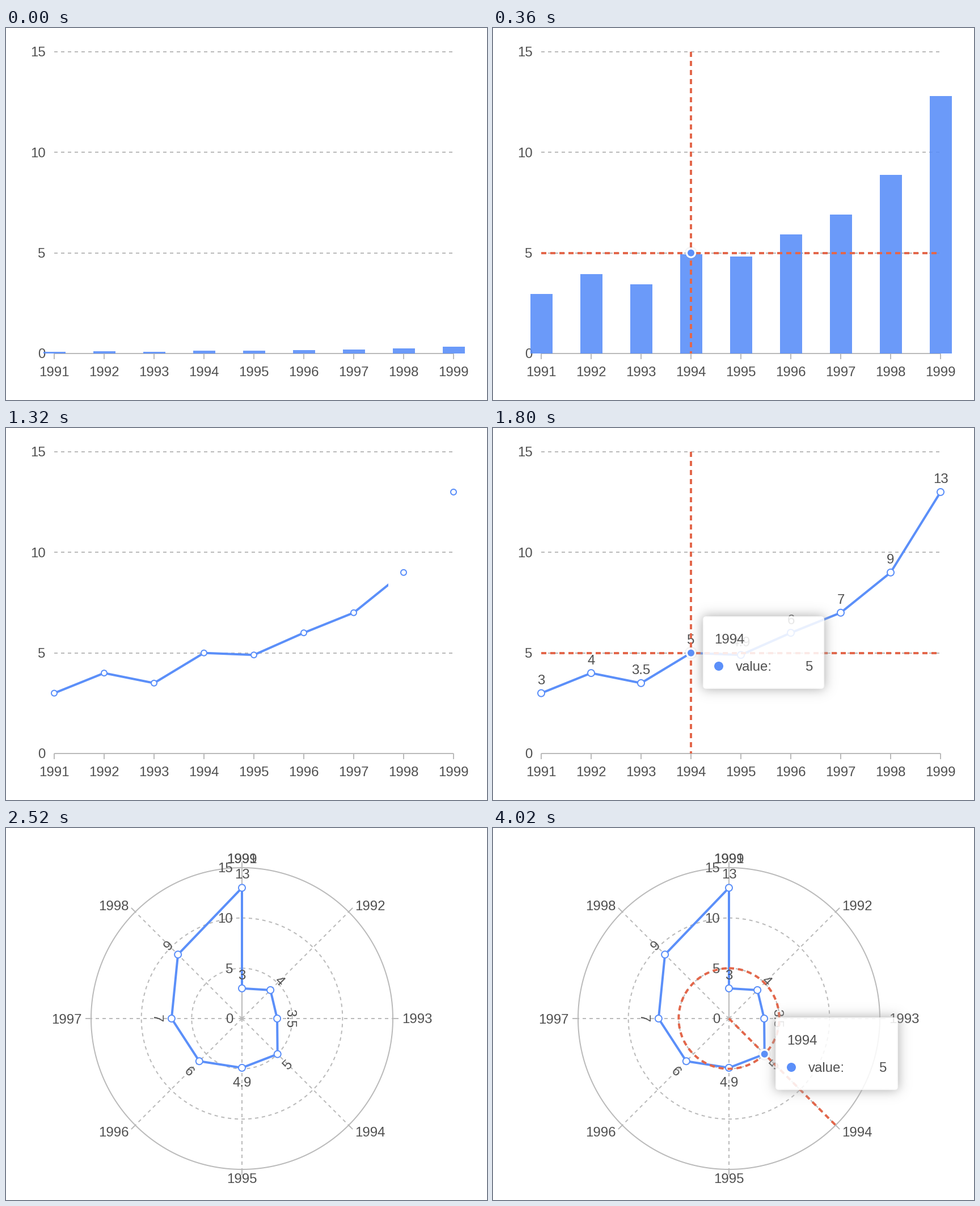
These frames come from a looping animation (848 by 656 pixels, 4080 ms). A matplotlib script:

```python
import math
from itertools import count

import matplotlib.pyplot as plt
import numpy as np
from matplotlib.animation import FuncAnimation
from matplotlib.lines import Line2D
from matplotlib.patches import Circle, FancyBboxPatch, Rectangle

plt.rcParams["font.family"] = "Liberation Sans"

W, H, DPI = 848, 656, 100
STEP, FRAMES = 60, 68
PT = 72 / DPI
YEARS = range(1991, 2000)
VALUES = np.array([3, 4, 3.5, 5, 4.9, 6, 7, 9, 13])
PICK = 3

BLUE, RED, GRAY, INK = "#5b8ff9", "#e3674b", "#bababa", "#505050"
GRID_DASH, CROSS_DASH = (6, 6), (9, 7)
LINE_AT, POLAR_AT = 1080, 2100
GROW = 416

LEFT, RIGHT, TOP, BASE = 85, 789, 42, 574
CX, CY, R = 416, 336, 266

fig = plt.figure(figsize=(W / DPI, H / DPI), dpi=DPI, facecolor="white")
ax = fig.add_axes((0, 0, 1, 1))
order = count(1)


def ease(t, duration=GROW, lead=0.0):
    t = min(max(t / duration + lead, 0), 1)
    return 1 - (1 - t) ** 2


def flat(i, v):
    return LEFT + 88 * np.asarray(i), BASE - np.asarray(v) * (BASE - TOP) / 15


def round_pos(i, r):
    a = np.asarray(i) * math.pi / 4
    return CX + r * np.sin(a), CY - r * np.cos(a)


def line(xs, ys, color=GRAY, width=2, dash=None, alpha=1):
    style = (0, [d / width for d in dash]) if dash else "-"
    art = Line2D(xs, ys, color=color, lw=width * PT, ls=style, alpha=alpha,
                 solid_capstyle="butt", solid_joinstyle="round", zorder=next(order))
    ax.add_line(art)
    return art


def patch(shape):
    shape.set_zorder(next(order))
    ax.add_patch(shape)


def dot(x, y, r, fill, edge="none", alpha=1):
    patch(Circle((x, y), r, fc=fill, ec=edge, lw=2 * PT, alpha=alpha))


def text(x, y, s, ha="center", turn=0, alpha=1):
    a = math.radians(turn)
    ax.text(x - 8.5 * math.sin(a), y + 8.5 * math.cos(a), s, ha=ha, va="baseline",
            rotation=-turn, rotation_mode="anchor", fontsize=24 * PT, color=INK,
            alpha=alpha, zorder=next(order))


def ring(r, **kw):
    line(*round_pos(np.linspace(0, 8, 241), r), **kw)


def flat_axes():
    for v in (5, 10, 15):
        y = flat(0, v)[1]
        line([LEFT, RIGHT], [y, y], dash=GRID_DASH)
    for v in (0, 5, 10, 15):
        text(69.5, flat(0, v)[1], str(v), "right")
    line([LEFT, RIGHT], [BASE, BASE])
    for i, year in enumerate(YEARS):
        x = flat(i, 0)[0]
        line([x, x], [BASE, BASE + 10])
        text(x, 606, str(year))


def polar_axes(alpha):
    for v in (5, 10):
        ring(v * R / 15, dash=GRID_DASH, alpha=alpha)
    ring(R, alpha=alpha)
    for i, year in enumerate(YEARS):
        ends = [round_pos(i, r) for r in (0, R, R + 10)]
        if i < 8:
            line(*zip(*ends[:2]), dash=GRID_DASH if i else None, alpha=alpha)
            line(*zip(*ends[1:]), alpha=alpha)
        ha = "center" if i % 4 == 0 else "left" if i < 4 else "right"
        text(*round_pos(i, R + 16), str(year), ha, alpha=alpha)
    for v in (0, 5, 10, 15):
        text(400, CY - v * R / 15, str(v), "right", alpha=alpha)


def labels(xs, ys, turns, alpha=1):
    if alpha > 0:
        for x, y, turn, v in zip(xs, ys, turns, VALUES):
            text(x, y, f"{v:g}", turn=turn, alpha=alpha)


def marker(x, y):
    dot(x, y, 11, "#888888", alpha=0.1)
    dot(x, y, 9.2, "white")
    dot(x, y, 6, BLUE)


def flat_cross():
    x, y = flat(PICK, VALUES[PICK])
    line([x, x], [TOP, BASE], RED, 4, CROSS_DASH)
    line([LEFT, RIGHT], [y, y], RED, 4, CROSS_DASH)
    marker(x, y)


def polar_cross():
    r = VALUES[PICK] * R / 15
    ring(r, color=RED, width=4, dash=CROSS_DASH)
    line(*zip((CX, CY), round_pos(PICK, R)), RED, 4, CROSS_DASH)
    marker(*round_pos(PICK, r))


def blur(n, pad, sigma=10):
    """Profile of a blurred bar of length n with pad on both sides."""
    s = sigma * math.sqrt(2)
    u = np.arange(n + 2 * pad) + 0.5 - pad
    return np.array([(math.erf(k / s) - math.erf((k - n) / s)) / 2 for k in u])


def tooltip(x, y, w, h=128, pad=30):
    shade = np.full((h + 2 * pad, w + 2 * pad, 4), 0.66)
    shade[..., 3] = np.outer(blur(h, pad), blur(w, pad))
    shade[pad + 2:-pad - 2, pad + 2:-pad - 2, 3] = 0
    ax.imshow(shade, extent=(x - pad, x + w + pad, y + h + pad, y - pad),
              aspect="auto", zorder=next(order))
    patch(FancyBboxPatch((x, y), w, h, boxstyle="round,pad=0,rounding_size=6",
                         fc="white", ec="none", alpha=0.87))
    text(x + 20, y + 40, str(YEARS[PICK]), "left")
    dot(x + 28, y + 88, 8, BLUE)
    text(x + 58, y + 88, "value:", "left")
    text(x + w - 20, y + 88, f"{VALUES[PICK]:g}", "right")


def flat_overlay(t):
    if t >= 300:
        flat_cross()
    if t >= 420:
        tooltip(370, 332, 214)


IDX = np.arange(9)
FLAT_X, FLAT_Y = flat(IDX, VALUES)
POLAR_X, POLAR_Y = round_pos(IDX, VALUES * R / 15)
TAG_X, TAG_Y = round_pos(IDX, VALUES * R / 15 + 24.5)
TURNS = np.array([0, 45, 90, -45, 0, 45, 90, -45, 0])


def bar_scene(t):
    p = ease(t, lead=0.0136)
    flat_axes()
    for x, y in zip(FLAT_X, FLAT_Y):
        patch(Rectangle((x - 19.2, BASE), 39, (y - BASE) * p, fc=BLUE, ec="none", alpha=0.9))
    labels(FLAT_X, FLAT_Y - 24, 0 * TURNS, ease(t - 400, 300))
    flat_overlay(t)


def line_scene(t):
    p = ease(t, lead=0.0136)
    flat_axes()
    curve = line(FLAT_X, FLAT_Y, BLUE, 4)
    clip = Rectangle((LEFT - 4, 0), (RIGHT - LEFT + 8) * p, H, transform=ax.transData)
    curve.set_clip_path(clip)
    for x, y in zip(FLAT_X, FLAT_Y):
        dot(x, y, 6 * p, "white", BLUE)
    labels(FLAT_X, FLAT_Y - 24, 0 * TURNS, ease(t - 400, 300))
    flat_overlay(t)


def polar_scene(t):
    p = ease(t, lead=0.0136)

    def mix(a, b):
        return a + (b - a) * p

    polar_axes(ease(t + 60, 400))
    xs, ys = mix(FLAT_X, POLAR_X), mix(FLAT_Y, POLAR_Y)
    line(np.append(xs, xs[0]), np.append(ys, ys[0]), BLUE, 4)
    for x, y in zip(xs, ys):
        dot(x, y, 6, "white", BLUE)
    labels(mix(FLAT_X, TAG_X), mix(FLAT_Y - 24, TAG_Y), TURNS * p)
    if t >= 720:
        polar_cross()
    if t >= 780:
        tooltip(498, 334, 216)


def draw(frame):
    global order
    order = count(1)
    ax.clear()
    ax.set_axis_off()
    ax.set_xlim(0, W)
    ax.set_ylim(H, 0)
    ax.set_autoscale_on(False)
    t = frame * STEP
    if t < LINE_AT:
        bar_scene(t)
    elif t < POLAR_AT:
        line_scene(t - LINE_AT)
    else:
        polar_scene(t - POLAR_AT)
    return []


anim = FuncAnimation(fig, draw, frames=FRAMES, interval=STEP, repeat=True,
                     repeat_delay=0, init_func=lambda: [])
plt.show()
```
